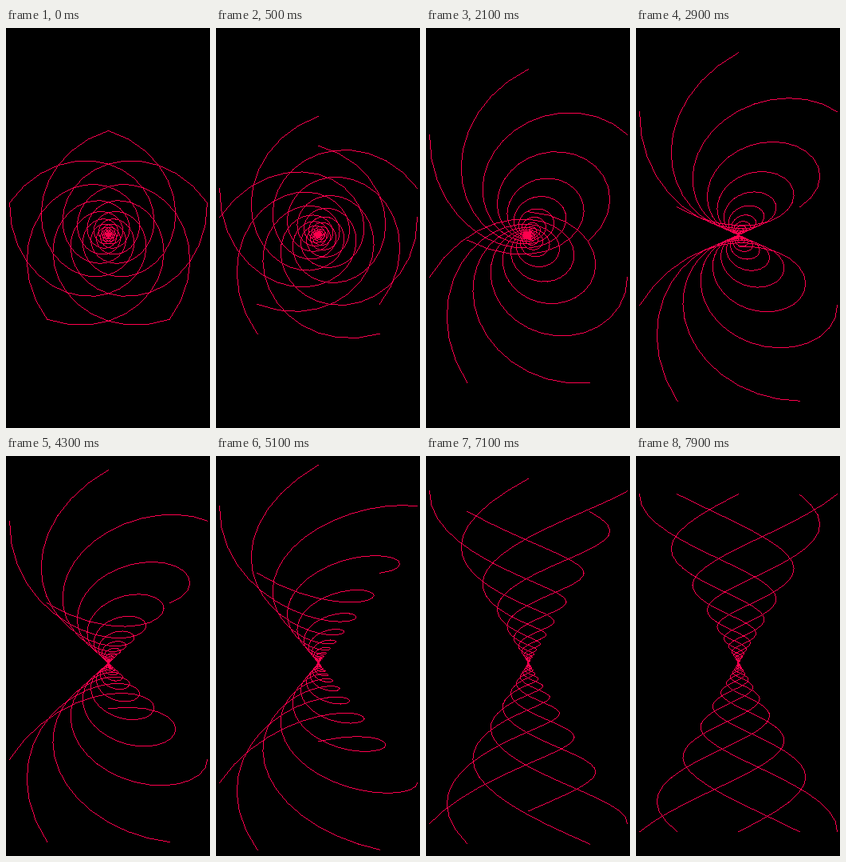
An HTML page with a canvas that plays this animation: 256 px wide and 500 px high, repeating every 8 s.

```html
<!DOCTYPE html>
<html lang="en">
<head>
<meta charset="utf-8">
<title>Golden spiral cones</title>
<style>
  html, body { margin: 0; width: 100%; height: 100%; overflow: hidden; background: #000; }
  canvas { display: block; width: 256px; height: 500px; image-rendering: pixelated; }
</style>
</head>
<body>
<canvas id="stage" width="256" height="500"></canvas>
<script>
const ctx = document.getElementById('stage').getContext('2d');
const PHI = (1 + Math.sqrt(5)) / 2;
const RADIUS = 130.4, CX = 128, CY = 258.25;
const ARMS = 5, TURNS = 3, STEPS_PER_TURN = 30;
const LOOP = 8000, TILT_STEP = 5 * Math.PI / 180;

const plot = (x, y) => ctx.fillRect(Math.round(x), Math.round(y), 1, 1);

// Crisp one-pixel line between fractional points, sampled once per pixel of the longer axis
function line([x0, y0], [x1, y1]) {
  const dx = x1 - x0, dy = y1 - y0;
  if (Math.abs(dx) > Math.abs(dy)) {
    const end = Math.round(Math.max(x0, x1));
    for (let x = Math.round(Math.min(x0, x1)); x <= end; x++) plot(x, y0 + (x - x0) * dy / dx);
  } else if (dy) {
    const end = Math.round(Math.max(y0, y1));
    for (let y = Math.round(Math.min(y0, y1)); y <= end; y++) plot(x0 + (y - y0) * dx / dy, y);
  }
}

// Golden spiral on a cone; side is +1 for the upper cone, -1 for the lower
function spiral(start, side, tilt) {
  let last;
  for (let i = 0; i <= TURNS * STEPS_PER_TURN; i++) {
    const turn = i / STEPS_PER_TURN;
    const r = RADIUS * PHI ** (-4 * turn);
    const angle = start - side * turn * 2 * Math.PI;
    const point = [
      CX + r * Math.sin(angle),
      CY - r * (Math.cos(angle) * Math.cos(tilt) + side * PHI * Math.sin(tilt))
    ];
    if (last) line(last, point);
    last = point;
  }
}

function draw(step) {
  ctx.fillStyle = '#000';
  ctx.fillRect(0, 0, 256, 500);
  ctx.fillStyle = '#ff004d';
  for (let arm = 0; arm < ARMS; arm++) {
    const start = arm * 2 * Math.PI / ARMS;
    spiral(start, 1, step * TILT_STEP);
    spiral(start, -1, step * TILT_STEP);
  }
}

// Steps every 400 ms, with a longer rest at step 7
function stepAt(t) {
  if (t < 500) return 0;
  if (t < 3900) return Math.min(7, Math.floor((t - 100) / 400));
  return Math.floor((t - 700) / 400);
}

const origin = performance.now();
let shown = -1;
function tick() {
  const step = stepAt((performance.now() - origin) % LOOP);
  if (step !== shown) draw(shown = step);
  requestAnimationFrame(tick);
}
tick();
</script>
</body>
</html>
```
